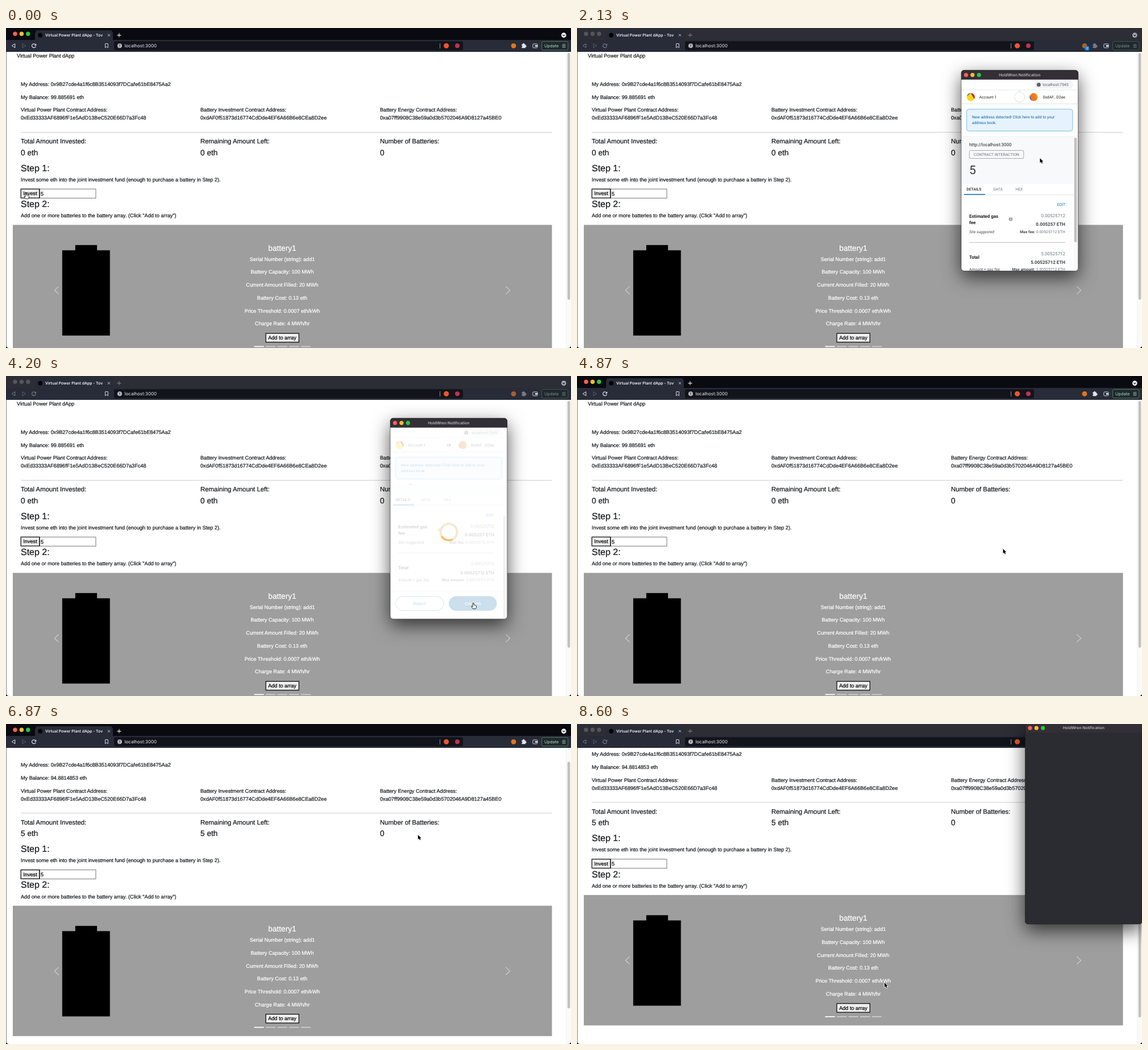
Write an HTML page with a canvas that moves like this. It is 994 px wide and 563 px high and loops after 8.87 s.

```html
<!DOCTYPE html>
<html lang="en">
<head>
<meta charset="utf-8">
<title>Virtual Power Plant dApp</title>
<style>
html, body { margin: 0; width: 100%; height: 100%; overflow: hidden; background: #000; }
canvas { display: block; width: 994px; height: 563px; }
</style>
</head>
<body>
<canvas id="stage"></canvas>
<script>
const W = 994, H = 563, LOOP = 8870, STEP = 200 / 3;
const canvas = document.getElementById('stage');
const g = canvas.getContext('2d');
const dpr = window.devicePixelRatio || 1;
canvas.width = W * dpr;
canvas.height = H * dpr;
g.textRendering = 'geometricPrecision';

const ARIAL = '"Liberation Sans", Arial, sans-serif';
const UI = 'Inter, sans-serif';
const ROBOTO = 'Roboto, sans-serif';

// ---- helpers ----
function text(str, x, y, size, color = '#16191c', font = ARIAL, align = 'left', style = '') {
  g.font = `${style} ${size}px ${font}`;
  g.textAlign = align;
  g.textBaseline = 'alphabetic';
  g.fillStyle = color;
  g.fillText(str, x, y + size * 0.35);
  if (font === ARIAL) { // a hairline gives the page text its heavier strokes
    g.strokeStyle = color;
    g.lineWidth = 0.22;
    g.strokeText(str, x, y + size * 0.35);
  }
}
function rect(x, y, w, h, color) {
  g.fillStyle = color;
  g.fillRect(x, y, w, h);
}
function round(x, y, w, h, r, fill, stroke, lw = 1) {
  g.beginPath();
  g.roundRect(x, y, w, h, r);
  if (fill) { g.fillStyle = fill; g.fill(); }
  if (stroke) { g.strokeStyle = stroke; g.lineWidth = lw; g.stroke(); }
}
function disc(x, y, r, fill, stroke, lw = 1) {
  g.beginPath();
  g.arc(x, y, r, 0, Math.PI * 2);
  if (fill) { g.fillStyle = fill; g.fill(); }
  if (stroke) { g.strokeStyle = stroke; g.lineWidth = lw; g.stroke(); }
}
function line(points, color, lw = 1, closed = false) {
  g.beginPath();
  points.forEach(([x, y], i) => i ? g.lineTo(x, y) : g.moveTo(x, y));
  if (closed) g.closePath();
  g.strokeStyle = color;
  g.lineWidth = lw;
  g.stroke();
}
// Linear interpolation through rows of [time, value, value...].
function track(t, rows) {
  let i = 0;
  while (i < rows.length - 1 && rows[i + 1][0] <= t) i++;
  const a = rows[i], b = rows[i + 1];
  if (!b || t < a[0]) return a.slice(1);
  const p = (t - a[0]) / (b[0] - a[0]);
  return a.slice(1).map((v, j) => v + (b[j + 1] - v) * p);
}
const within = (t, a, b) => t >= a && t < b;

// ---- motion ----
const POINTER = [
  [0, 35, 290], [133, 548, 180], [467, 548, 180], [930, 925, 12], [1200, 925, 12],
  [1400, 812.5, 88], [1920, 812.5, 88], [1930, 814.5, 229], [2267, 814.5, 229],
  [3000, 815, 245], [3067, 815, 245], [3467, 763, 267], [3920, 763, 267],
  [3930, 822, 399], [4400, 822, 399], [4733, 749.5, 304], [5067, 749.5, 304],
  [5333, 745, 196], [5533, 745, 196], [5800, 584, 246], [6133, 745, 196],
  [6467, 745, 196], [6800, 725, 194.5], [7133, 724, 196.5], [7667, 494, 499],
  [8133, 494, 499], [8467, 541, 455]
];
const PAGE_SCROLL = [[6200, 0], [6467, 3.4], [6867, 26.7], [7133, 45.5]];
const POP_SCROLL = [[2267, 0], [3000, 44], [3067, 46.5], [3333, 66]];
const POP_SHIFT = [[1200, 112.5, -75.5], [1400, 0, 0]];

// ---- browser frame ----
function trafficLights(x, y, gap, r, on) {
  ['#ff5f57', '#febc2e', '#28c840'].forEach((c, i) => disc(x + i * gap, y, r, on ? c : '#54565d'));
}
function browser(active, badge) {
  const icon = active ? '#e4e6ec' : '#777b86', dim = '#595d68';
  rect(0, 0, W, 22, active ? '#0a0b11' : '#2d2e35');
  trafficLights(16, 10.3, 11.4, 3.7, active);
  round(51, 4, 137, 22, [5, 5, 0, 0], '#282c38');
  rect(0, 21, W, 21, '#282c38');
  disc(60.3, 12.7, 4, '#000');
  text('Virtual Power Plant dApp - Tov', 69, 12.5, 6.85, '#f1f2f5', UI, 'left', '600');
  line([[179, 10.6], [183, 14.6]], '#d5d7dd', 0.9);
  line([[183, 10.6], [179, 14.6]], '#d5d7dd', 0.9);
  line([[195.5, 12.6], [202.5, 12.6]], icon, 1.1);
  line([[199, 9.1], [199, 16.1]], icon, 1.1);
  disc(981.3, 12.6, 4.3, active ? '#f1f2f5' : '#a6a9b1');
  line([[979.3, 11.8], [981.3, 13.9], [983.3, 11.8]], '#15171e', 1.1);

  line([[15.8, 27.7], [15.8, 34.7], [10.2, 31.2]], icon, 1, true);
  line([[29, 27.7], [29, 34.7], [34.6, 31.2]], dim, 1, true);
  g.beginPath();
  g.arc(49, 31.2, 3.4, 0.3, 5.5);
  g.strokeStyle = icon; g.lineWidth = 1.2; g.stroke();
  g.beginPath();
  g.moveTo(53.2, 27.2); g.lineTo(53.2, 30.9); g.lineTo(49.7, 30.9);
  g.fillStyle = icon; g.fill();
  line([[174.6, 27.6], [179.4, 27.6], [179.4, 34.8], [177, 32.6], [174.6, 34.8]], '#d5d7dd', 1, true);

  round(190, 23.3, 614, 16, 3, '#12141b');
  disc(200, 31.3, 4, '#b7bac2');
  rect(199.5, 28.8, 1, 3, '#12141b');
  rect(199.5, 32.6, 1, 1, '#12141b');
  text('localhost:3000', 208.5, 31.2, 8, '#eceef2', UI);
  rect(763, 27, 1, 9, '#8b8f99');
  disc(774.6, 31.3, 4.5, '#f1562b');
  disc(794, 31.3, 4, '#c4304f');

  disc(893, 31.3, 4.4, active ? '#e2761b' : '#a9602a');
  if (badge) {
    round(893.5, 32, 7.8, 7.6, 2, '#1b82dd');
    text('1', 897.4, 35.9, 5.6, '#fff', UI, 'center', '600');
  }
  round(907.3, 28.6, 6.6, 6.6, 0.8, icon);
  disc(910.6, 28.2, 1.5, icon);
  disc(914.3, 31.9, 1.5, icon);
  disc(907.4, 32, 1.1, '#282c38');
  round(926.8, 28, 8.2, 6.8, 1.4, null, '#d5d7dd', 1);
  rect(930.8, 30, 4.2, 3, '#d5d7dd');
  round(942.5, 23.7, 46.3, 15.2, 2.5, '#20282d', active ? '#4b8a63' : '#41604f', 0.9);
  text('Update', 947, 31.3, 7.4, active ? '#a8dbb9' : '#7c8f86', UI);
  for (let i = 0; i < 3; i++) rect(978.5, 28.6 + i * 2.5, 6, 0.9, active ? '#a8dbb9' : '#7c8f86');
}

// ---- web page ----
function carousel() {
  rect(12, 346.4, 948.5, 229.4, '#9e9e9e');
  rect(122, 382, 38, 10, '#000');
  rect(99, 391.2, 83.7, 149.8, '#000');
  line([[99, 391.2], [122, 391.2], [122, 382], [160, 382], [160, 391.2], [182.7, 391.2],
    [182.7, 541], [99, 541]], 'rgba(0,0,0,0.3)', 0.8, true);
  line([[92.6, 454.6], [85.4, 461.4], [92.6, 468.2]], '#d2d2d2', 1.1);
  line([[879.4, 454.6], [886.6, 461.4], [879.4, 468.2]], '#d2d2d2', 1.1);
  text('battery1', 486, 387.2, 13.7, '#fff', ARIAL, 'center');
  [
    'Serial Number (string): add1', 'Battery Capacity: 100 MWh', 'Current Amount Filled: 20 MWh',
    'Battery Cost: 0.13 eth', 'Price Threshold: 0.0007 eth/kWh', 'Charge Rate: 4 MWh/hr'
  ].forEach((s, i) => text(s, 486, 406.5 + i * 22.75, 9.14, '#fff', ARIAL, 'center'));
  rect(456.5, 536.7, 59.4, 16.6, '#000');
  rect(457.7, 537.9, 57, 14.2, '#efefef');
  text('Add to array', 486, 544.9, 9.14, '#000', ARIAL, 'center');
  for (let i = 0; i < 5; i++) rect(436.5 + i * 20.55, 559.5, 17.2, 1.7, i ? '#cecece' : '#fff');
}
function page(scroll, paid) {
  g.save();
  g.beginPath();
  g.rect(0, 42, W, H - 42);
  g.clip();
  rect(0, 42, W, H - 42, '#fff');
  g.save();
  g.translate(0, -scroll);
  const eth = paid ? '5 eth' : '0 eth';
  text('Virtual Power Plant dApp', 19, 49.3, 9.14);
  text('My Address: 0x9B27cde4a1f6c8B3514093f7DCafe61bE8475Aa2', 26, 98.8, 9.14);
  text(`My Balance: ${paid ? '94.8814853' : '99.885691'} eth`, 26, 121.6, 9.14);
  [
    [26, 'Virtual Power Plant Contract Address:', '0xEd33333AF6896fF1e5AdD13BeC520E66D7a3Fc48', 'Total Amount Invested:', eth],
    [342, 'Battery Investment Contract Address:', '0xdAF0f51873d16774CdDde4EF6A66B6e8CEa8D2ee', 'Remaining Amount Left:', eth],
    [658, 'Battery Energy Contract Address:', '0xa07ff9908C38e59a0d3b5702046A9D8127a45BE0', 'Number of Batteries:', '0']
  ].forEach(([x, label, hash, stat, value]) => {
    text(label, x, 144.3, 9.14);
    text(hash, x, 158, 9.14);
    text(stat, x, 199.3, 11.4);
    text(value, x, 219.2, 13.7);
  });
  rect(26, 183, 934.5, 0.9, '#c4c6c8');
  text('Step 1:', 26, 246, 16);
  text('Invest some eth into the joint investment fund (enough to purchase a battery in Step 2).', 26, 266.7, 9.14);
  rect(59, 282.8, 99.5, 17, '#767676');
  rect(60, 283.8, 97.5, 15, '#fff');
  text('5', 61, 291.4, 9.14, '#000');
  rect(25.6, 282.7, 33.8, 17, '#000');
  rect(26.8, 283.9, 31.4, 14.6, '#efefef');
  text('Invest', 42.5, 291.3, 9.14, '#000', ARIAL, 'center');
  text('Step 2:', 26, 309.5, 16);
  text('Add one or more batteries to the battery array. (Click "Add to array")', 26, 330.2, 9.14);
  carousel();
  g.restore();
  rect(985.6, 42, 8.4, H - 42, '#fafafa');
  rect(985.6, 42, 0.6, H - 42, '#e4e4e4');
  round(987.8, 44 + scroll * 0.84, 4.6, 434, 2.3, '#c1c1c1');
  g.restore();
  rect(0, 42, 0.7, H - 42, '#4a4a4a');
}

// ---- wallet window ----
function wheel(x, y, r, base, slices) {
  disc(x, y, r, base);
  slices.forEach(([from, to, color]) => {
    g.beginPath();
    g.arc(x, y, r, from, to);
    g.closePath();
    g.fillStyle = color;
    g.fill();
  });
}
function spinner(angle) {
  disc(779, 274.5, 14.5, null, '#f8e6cc', 3.6);
  g.beginPath();
  g.arc(779, 274.5, 14.5, angle, angle + 1.5);
  g.strokeStyle = '#f7c06c';
  g.lineWidth = 3.6;
  g.stroke();
}
function request(scroll, loaded, hover) {
  const font = loaded ? UI : ROBOTO, k = loaded ? 0.94 : 1;
  const small = 6.86 * k, base = 8 * k;
  const ink = '#1c1f22', grey = '#6a737d', blue = '#0072d0', note = '#0b5fa6';
  const bold = loaded ? '600' : 'bold';
  const put = (s, x, y, size, color, align, style) => text(s, x, y, size, color, font, align, style);

  round(loaded ? 801.5 : 804, 93, loaded ? 71.5 : 69, 13.6, 6.8, '#f2f3f4');
  disc(loaded ? 809.6 : 812.3, 99.8, 3.5, '#5c6167');
  if (loaded) text('?', 809.6, 99.8, 5, '#fff', UI, 'center', '600');
  put('localhost:7545', 864.5, 99.8, small, '#565d64', 'right');
  rect(676, 108.6, 205.5, 0.7, '#d6d9dc');
  rect(676, 133, 205.5, 0.7, '#d6d9dc');
  wheel(692.8, 121.6, 7, '#f5d90f', [[-1.6, 0.5, '#d81f3c'], [-2.9, -1.6, '#1c67a8']]);
  put('Account 1', 707.5, 121.6, small, ink);
  rect(778, 109, 0.7, 24, '#d6d9dc');
  disc(778.7, 121.5, 9, '#fff', '#d6d9dc', 0.8);
  if (loaded) {
    line([[774.8, 121.6], [782.4, 121.6]], ink, 1);
    line([[779.3, 118.5], [782.4, 121.6], [779.3, 124.7]], ink, 1);
  }
  wheel(803.4, 121.6, 7, '#f5761a', [[-1.2, 0.6, '#f2a11f'], [2.1, 3.6, '#2a6fc9']]);
  put('0xdAF...D2ee', 859, 121.6, small, ink, 'right');
  round(685.5, 142.8, 186.5, 38.5, 4, '#e6f3fd', '#6fb4e6', 0.9);
  put('New address detected! Click here to add to your', 695, 156.8, small, note);
  put('address book.', 695, 166.8, small, note);

  g.save();
  g.beginPath();
  g.rect(676, 190.5, 205.5, 237);
  g.clip();
  rect(676, 190.5, 205.5, 0.8, '#d6d9dc');
  g.save();
  g.translate(0, -scroll);
  rect(676, 191.3, 197, 83, '#f8f9fa');
  put('http://localhost:3000', 690, 205.5, base, ink);
  round(690.3, 215.5, 95.5, 14, 2, null, '#8f959b', 0.8);
  put('CONTRACT INTERACTION', 738, 222.6, small, grey, 'center');
  if (loaded) disc(698.3, 249.7, 5.2, '#3c3c3d');
  put('5', loaded ? 705.8 : 690, 250, 21, '#34383c', 'left', loaded ? '500' : '');
  const tab = 6.7 * k;
  put('DETAILS', 685.3, 283.4, tab, ink, 'left', '500');
  put('DATA', loaded ? 731 : 732.5, 283.4, tab, grey);
  put('HEX', loaded ? 770.3 : 771.5, 283.4, tab, grey);
  rect(676, 293, 197, 0.7, '#d6d9dc');
  rect(681, 292, 37, 1.5, blue);

  put('EDIT', 859, 311, small, blue, 'right');
  put('Estimated gas', 690, 331.2, base, ink, 'left', bold);
  put('fee', 690, 342, base, ink, 'left', bold);
  disc(763, 336.3, 3.4, '#a4a9ae');
  rect(762.6, 335.8, 0.9, 2.4, '#fff');
  rect(762.6, 334.2, 0.9, 0.9, '#fff');
  put('0.00525712', 859, 330.2, base, grey, 'right');
  put('0.005257 ETH', 859, 345.4, base, '#3c4044', 'right', bold);
  put('Site suggested', 690, 358.3, small, '#44484d', 'left', 'italic');
  const limit = (label, value, y) => {
    put(value, 859, y, small, grey, 'right');
    const w = g.measureText(value).width;
    put(label, 857 - w, y, small, '#44484d', 'right', bold);
  };
  limit('Max fee:', '0.00525712 ETH', 358.3);
  rect(690, 377, 169, 0.9, '#b5b9bd');
  put('Total', 690, 403.4, base, ink, 'left', bold);
  put('5.00525712', 859, 396.7, base, grey, 'right');
  put('5.00525712 ETH', 859, 412, base, '#3c4044', 'right', bold);
  put('Amount + gas fee', 690, 425, small, '#44484d');
  limit('Max amount:', '5.00525712 ETH', 425);

  rect(676, 444.5, 197, 0.7, '#d6d9dc');
  round(685.5, 453.7, 84.5, 25, 12.5, '#fff', blue, 0.9);
  put('Reject', 727.7, 466.4, base, blue, 'center', '500');
  round(779, 453.3, 84.5, 25.8, 12.9, hover ? '#0260a4' : blue);
  put('Confirm', 821.2, 466.4, base, '#fff', 'center', '500');
  g.restore();
  rect(873, 191, 8.5, 237, '#fafafa');
  round(874.8, 193 + scroll * 0.79, 4.6, 184, 2.3, '#c1c1c1');
  g.restore();
}
function wallet(t) {
  const late = t > 8000;
  const [dx, dy] = late ? [112.5, -75.5] : track(t, POP_SHIFT);
  const dark = late || t < 860;
  g.save();
  g.translate(dx, dy);
  g.save();
  g.shadowColor = 'rgba(0,0,0,0.68)';
  g.shadowBlur = 32 * dpr;
  g.shadowOffsetY = 11 * dpr;
  round(676, 74.3, 205.7, 353.2, 5, '#2c2c32');
  g.restore();
  g.save();
  g.beginPath();
  g.roundRect(676, 74.3, 205.7, 353.2, 5);
  g.clip();
  rect(676, 74, 206, 17, '#332f37');
  rect(676, 90.8, 206, 337, dark ? '#2b2c31' : '#fff');
  trafficLights(684.4, 82.6, 11.4, 3.6, true);
  text('HoldWren Notification', 778.8, 82.4, 6.85, '#b9b8bd', UI, 'center', '600');
  if (!dark && t < 2130) spinner(t < 1067 ? 0 : t < 1130 ? 1.2 : t < 1930 ? 2.4 : 4.2);
  if (within(t, 2130, 4870)) {
    request(track(t, POP_SCROLL)[0], t >= 2195, t >= 3925);
    if (t >= 4065) {
      rect(676, 91, 206, 337, 'rgba(255,255,255,0.8)');
      spinner(t / 160);
    }
  }
  g.restore();
  round(676, 74.3, 205.7, 353.2, 5, null, 'rgba(20,20,24,0.7)', 0.7);
  g.restore();
}

// ---- pointer ----
function outlined(path, x, y) {
  g.save();
  g.translate(x, y);
  g.lineJoin = 'round';
  const p = new Path2D(path);
  g.strokeStyle = '#fff';
  g.lineWidth = 1.6;
  g.stroke(p);
  g.fillStyle = '#000';
  g.fill(p);
  g.restore();
}
function pointer(t) {
  const [x, y] = track(t, POINTER);
  if (t < 60 || within(t, 3925, 4400) || within(t, 7660, 8190)) {
    g.save();
    g.translate(x, y);
    const hand = new Path2D('M-1 .8Q0-.5 1 .8V4Q2 3.4 2.7 4.2Q3.8 3.8 4.2 4.7Q5.4 4.5 5.4 5.8V8L4.3 10.6H-.5L-3 7Q-3.4 5.6-2.2 5.8L-1 7Z');
    g.fillStyle = '#fff';
    g.fill(hand);
    g.strokeStyle = '#000';
    g.lineWidth = 0.8;
    g.stroke(hand);
    g.restore();
  } else if (within(t, 5330, 5590) || within(t, 6130, 6530)) {
    const cx = x + 3.5, cy = y + 4.5;
    line([[cx, cy - 4], [cx, cy + 4]], '#222', 0.9);
    line([[cx - 1.8, cy - 4.4], [cx, cy - 3.6], [cx + 1.8, cy - 4.4]], '#222', 0.8);
    line([[cx - 1.8, cy + 4.4], [cx, cy + 3.6], [cx + 1.8, cy + 4.4]], '#222', 0.8);
  } else {
    outlined('M0 0V8.2L1.9 6.5L3.2 9.4L4.6 8.8L3.4 6H5.8Z', x, y);
  }
}

function draw(t) {
  const open = within(t, 595, 4865) || t >= 8525;
  const badge = (open && t < 4065) || t >= 8525;
  g.setTransform(dpr, 0, 0, dpr, 0, 0);
  rect(0, 0, W, H, '#000');
  g.save();
  g.beginPath();
  g.roundRect(0, 0, W, H, [0, 0, 5, 5]);
  g.clip();
  page(track(t, PAGE_SCROLL)[0], t >= 4930);
  browser(!open, badge);
  if (open) wallet(t);
  g.restore();
  pointer(t);
}
function frame() {
  const t = performance.now() % LOOP;
  draw(Math.floor((t + 3.4) / STEP) * STEP);
  requestAnimationFrame(frame);
}
frame();
</script>
</body>
</html>
```
